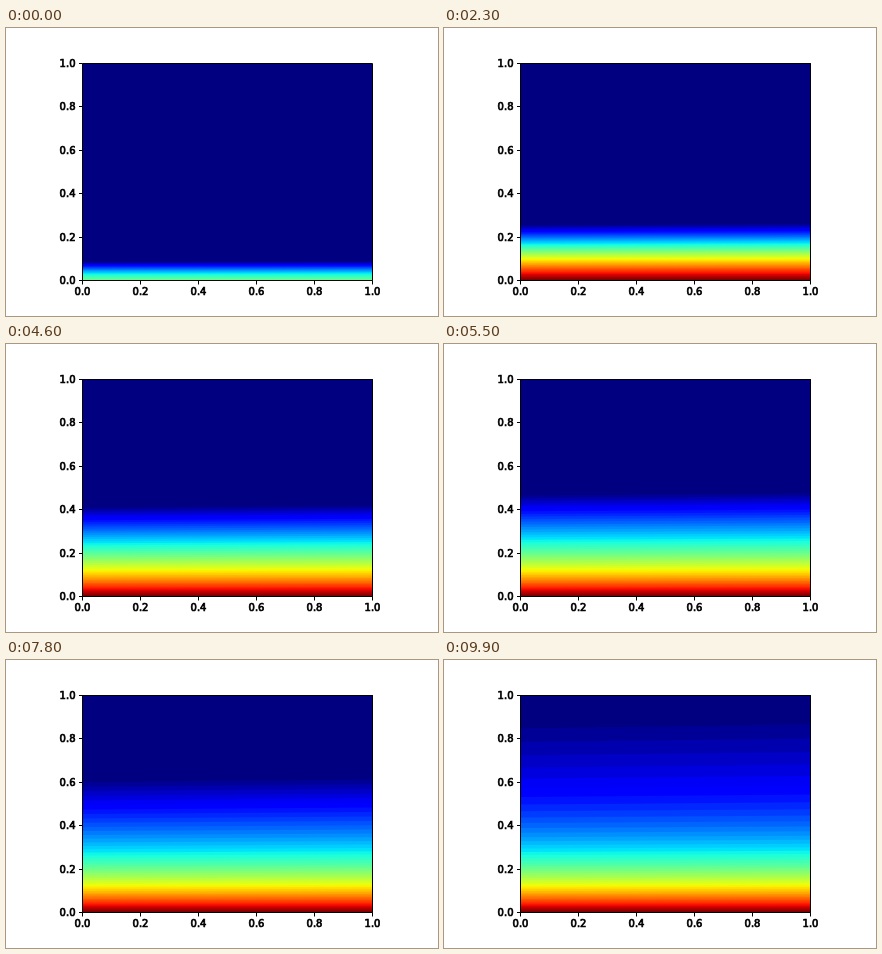
Recreate the animation shown at these times as an HTML page with a canvas. Size 432 by 288 pixels, loop 10000 ms.

```html
<!DOCTYPE html>
<html lang="en">
<head>
<meta charset="utf-8">
<title>Front spreading upwards</title>
<style>
  html, body { margin: 0; width: 100%; height: 100%; overflow: hidden; background: #fff; }
  canvas, svg { position: absolute; left: 0; top: 0; width: 432px; height: 288px; }
  text { font: 10px "DejaVu Sans", sans-serif; stroke: #000; stroke-width: .7px; }
  path { fill: none; stroke: #000; stroke-width: 1; }
</style>
</head>
<body>
<canvas id="field" width="432" height="288"></canvas>
<svg id="axes" viewBox="0 0 432 288"></svg>
<script>
const LEFT = 76.5, RIGHT = 366.5, TOP = 35.5, BOTTOM = 252.5;
const LOOP = 10000, STEP = 100, BANDS = 50;
const TILT = 0.02;   // contours sit this much lower at the left edge
const DECAY = 60;    // px over which the settled profile falls by a factor e

// Height of the front in px, s in seconds; it runs off in the last second.
const front = s => 19 + 17.2 * s - .28 * s * s + 39 * (s / 9.9) ** 16;

// Exponential decay above the base, cut off at the front.
function profileAt(s) {
  const f = front(s);
  const base = Math.min(1, .47 + .3 * s);
  const sharpness = Math.max(1.75, f / 23);
  const value = h => base * Math.exp(-h / DECAY) * (1 - (h / f) ** sharpness);
  return { f, value };
}

// Height at which the falling profile reaches v, by bisection.
function heightOf(v, { f, value }) {
  let low = 0, high = f;
  for (let i = 0; i < 16; i++) {
    const mid = (low + high) / 2;
    if (value(mid) > v) low = mid; else high = mid;
  }
  return low;
}

function ramp(v, xs, ys) {
  let i = 0;
  while (i < xs.length - 2 && v > xs[i + 1]) i++;
  return ys[i] + (ys[i + 1] - ys[i]) * (v - xs[i]) / (xs[i + 1] - xs[i]);
}

function jet(v) {
  const rgb = [
    ramp(v, [0, .35, .66, .89, 1], [0, 0, 1, 1, .5]),
    ramp(v, [0, .125, .375, .64, .91, 1], [0, 0, 1, 1, 0, 0]),
    ramp(v, [0, .11, .34, .65, 1], [.5, 1, 1, 0, 0])
  ];
  return `rgb(${rgb.map(c => Math.round(c * 255))})`;
}

const colors = Array.from({ length: BANDS }, (_, k) => jet(k / (BANDS - 1)));
const ctx = document.getElementById("field").getContext("2d");
ctx.beginPath();
ctx.rect(LEFT, TOP, RIGHT - LEFT, BOTTOM - TOP);
ctx.clip();

function draw(t) {
  const profile = profileAt(t / 1000);
  ctx.fillStyle = colors[0];
  ctx.fillRect(LEFT, TOP, RIGHT - LEFT, BOTTOM - TOP);
  for (let k = 1; k < BANDS; k++) {
    const h = heightOf(k / BANDS, profile);
    if (h < .01) break;
    ctx.fillStyle = colors[k];
    ctx.beginPath();
    ctx.moveTo(LEFT, BOTTOM);
    ctx.lineTo(LEFT, BOTTOM - .5 - h * (1 - TILT));
    ctx.lineTo(RIGHT, BOTTOM - .5 - h);
    ctx.lineTo(RIGHT, BOTTOM);
    ctx.fill();
  }
}

function buildAxes() {
  let path = `M${LEFT} ${TOP}H${RIGHT}V${BOTTOM}H${LEFT}Z`, labels = "";
  const label = (x, y, anchor, s) =>
    `<text x="${x}" y="${y}" text-anchor="${anchor}">${s}</text>`;
  for (let i = 0; i <= 5; i++) {
    const x = LEFT + (RIGHT - LEFT) * i / 5;
    const y = Math.round(BOTTOM - (BOTTOM - TOP) * i / 5 - .5) + .5;
    const s = (i / 5).toFixed(1);
    path += `M${x} ${BOTTOM}v4M${LEFT} ${y}h-3.5`;
    labels += label(x, 267, "middle", s) + label(69.5, y + 3.5, "end", s);
  }
  document.getElementById("axes").innerHTML = `<path d="${path}"/>${labels}`;
}

let shown = -1;
const start = performance.now();
function tick() {
  const t = (performance.now() - start) % LOOP;
  const step = Math.floor(t / STEP);
  if (step !== shown) draw((shown = step) * STEP);
  requestAnimationFrame(tick);
}

buildAxes();
tick();
</script>
</body>
</html>
```
